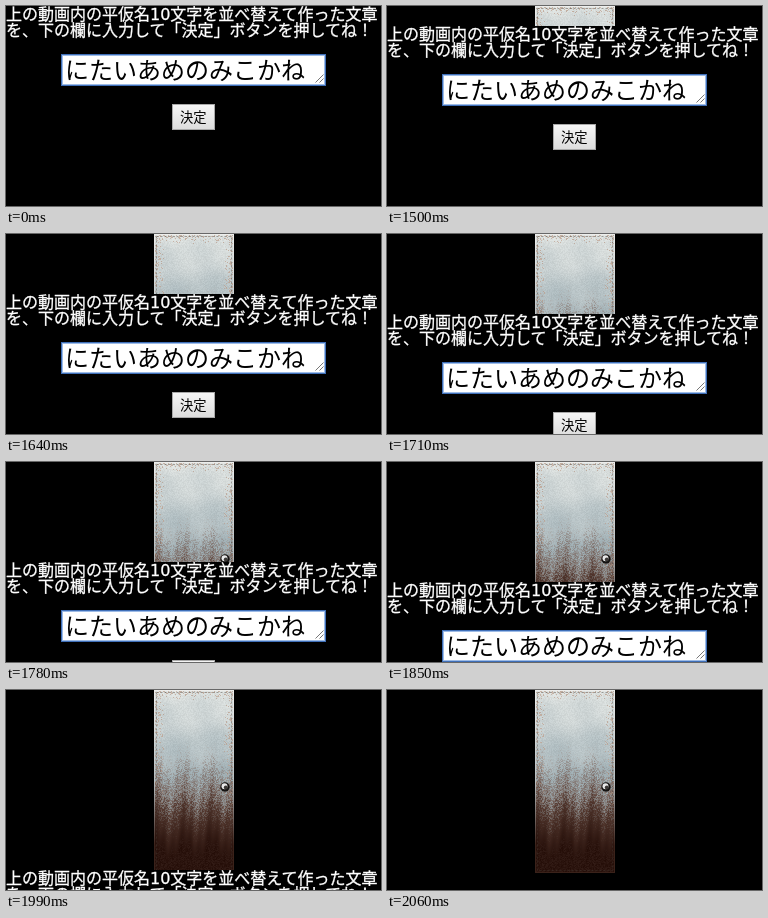
Write an HTML page with a canvas that moves like this. It is 375x200 px and loops after 2.13 s.

```html
<!DOCTYPE html>
<html lang="ja">
<head>
<meta charset="utf-8">
<style>
  html, body { margin: 0; width: 100%; height: 100%; overflow: hidden; background: #000; }
  canvas, svg { position: absolute; left: 0; top: 0; }
  text { font-family: "DejaVu Sans", "Noto Sans CJK JP", "Noto Sans CJK", sans-serif; }
</style>
</head>
<body>
<canvas id="door" width="375" height="200"></canvas>
<svg width="375" height="200">
  <defs>
    <linearGradient id="face" x2="0" y2="1">
      <stop stop-color="#f6f6f6"/>
      <stop offset="1" stop-color="#dcdcdc"/>
    </linearGradient>
  </defs>
  <g id="page">
    <rect width="375" height="200"/>
    <g fill="#fff" stroke="#fff" stroke-width=".3" font-size="16">
      <text y="14">上の動画内の平仮名10文字を並べ替えて作った文章</text>
      <text y="30">を、下の欄に入力して「決定」ボタンを押してね！</text>
    </g>
    <rect x="55.5" y="48.5" width="264" height="31" fill="#fff" stroke="#3f6fb8"/>
    <rect x="56.5" y="49.5" width="262" height="29" fill="none" stroke="#9dbbe6"/>
    <text x="59" y="73" font-size="24">にたいあめのみこかね</text>
    <path d="M309.5 76.5l8-8M313.5 76.5l4-4" stroke="#777"/>
    <rect x="166.5" y="98.5" width="42" height="25" fill="url(#face)" stroke="#a9a9a9"/>
    <text x="174" y="116" font-size="13.3">決定</text>
  </g>
</svg>
<script>
const LOOP = 2130, HOLD = 1500, STEP = 70;
const page = document.getElementById('page');
const ctx = document.getElementById('door').getContext('2d');

let seed = 7;
const random = () => (seed = seed * 16807 % 2147483647) / 2147483647;
const clamp = v => Math.max(0, Math.min(1, v));
const mix = (a, b, k) => a.map((v, i) => v + (b[i] - v) * k);

function disc(x, y, r, color) {
  ctx.fillStyle = color;
  ctx.beginPath();
  ctx.arc(x, y, r, 0, 7);
  ctx.fill();
}

function drawDoor() {
  const left = 148, width = 80, height = 183;
  const pale = [222, 226, 224], steel = [166, 181, 186];
  const rust = [98, 68, 57], dark = [43, 20, 14], tan = [188, 158, 140];

  // Pale steel turns to rust in uneven streaks, then to dark brown
  for (let y = 0; y < height; y++) {
    for (let x = 0; x < width; x++) {
      const streak = 7 * Math.sin(x * .23 + 1) + 4 * Math.sin(x * .71 + y * .05);
      const cloud = Math.sin(x * .09 + y * .05) * Math.sin(y * .11 - x * .06);
      const grain = random() - .5;
      const edge = Math.min(x, width - 1 - x, y);
      let color = mix(pale, steel, clamp(y / 85 + .15 * cloud));
      if (random() < .3 * clamp(1 - edge / 10)) color = mix(color, tan, .7);
      color = mix(color, rust, clamp((y - 72 + streak + grain * 38) / 60));
      color = mix(color, dark, clamp((y - 104 + streak + grain * 16) / 54));
      color = color.map(v => v + grain * 14);
      ctx.fillStyle = `rgb(${color.map(Math.round)})`;
      ctx.fillRect(left + x, y, 1, 1);
    }
  }

  const rim = ctx.createLinearGradient(0, 0, 0, height);
  rim.addColorStop(0, '#eeeeec');
  rim.addColorStop(.5, '#b9bfc0');
  rim.addColorStop(.85, '#3a221a');
  ctx.strokeStyle = rim;
  ctx.strokeRect(left + .5, .5, width - 1, height - 1);
  ctx.strokeStyle = 'rgba(70,60,55,.45)';
  ctx.setLineDash([2, 2]);
  ctx.strokeRect(left + 2.5, 2.5, width - 5, height - 5);

  disc(219, 97, 4.7, '#151312');
  disc(218.5, 96.3, 3, '#e9e9e9');
  disc(219.8, 97.6, 2, '#3b3836');
}

function frame() {
  const t = performance.now() % LOOP;
  const step = t < HOLD ? 0 : Math.floor((t - HOLD) / STEP) + 1;
  // The last steps skip one notch
  const drop = 20 * (step > 7 ? step + 1 : step);
  page.setAttribute('transform', `translate(0 ${drop})`);
  requestAnimationFrame(frame);
}

drawDoor();
frame();
</script>
</body>
</html>
```
